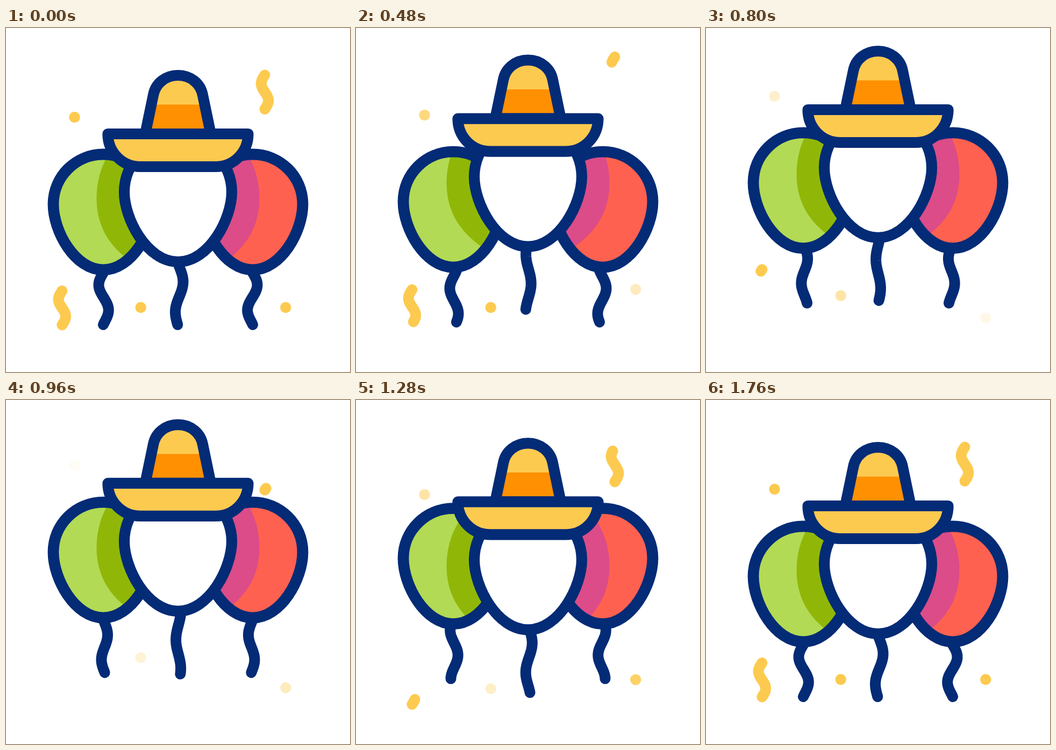
An HTML page with a canvas for the animation above (1.88 s loop, 640x640 px).

```html
<!DOCTYPE html>
<html lang="en">
<head>
<meta charset="utf-8">
<title>Party balloons</title>
<style>
html, body { margin: 0; width: 100%; height: 100%; overflow: hidden; background: #fff; }
canvas { display: block; width: 640px; height: 640px; }
</style>
</head>
<body>
<canvas id="stage" width="640" height="640"></canvas>
<script>
const ctx = document.getElementById('stage').getContext('2d');
const LOOP = 1880, STEP = 40, TAU = Math.PI * 2;
const NAVY = '#042b76', YELLOW = '#fdca50', ORANGE = '#ff9001';

const sideEgg = new Path2D('M181 235C130 235 88 276 88 328C88 378 128 450 181 450C234 450 274 378 274 328C274 276 232 235 181 235Z');
const midEgg = new Path2D('M320 205C265 205 220 250 220 305C220 355 262 435 320 435C378 435 420 355 420 305C420 250 375 205 320 205Z');
const shade = new Path2D('M206 216C182 240 168.5 278 168.5 316C168.5 360 184 403 240 440L320 440V216Z');
const crown = new Path2D('M259 197L274 125C278 103 297 88 320 88C343 88 362 103 366 125L381 197Z');
const brim = new Path2D('M189.5 197H450.5C450.5 231 424 258 390 258H250C216 258 189.5 231 189.5 197Z');

// A wave runs once down each string between start and end
const sideString = { x: 181.3, y: 455, length: 97, wave: 92, phase: 0.5, amp: 8.8, sway: 2, tip: 2.6, start: 340, end: 1480 };
const midString = { x: 322.8, y: 442, length: 110, wave: 108, phase: 0.03, amp: 6.7, sway: -2.3, tip: -3, start: 80, end: 1440 };

// Confetti floats off between out and back, then returns until end
const dots = [
  { x: 127.5, y: 166, out: 300, back: 1000, end: 1560 },
  { x: 520.3, y: 520, out: 80, back: 720, end: 1360 },
  { x: 250.7, y: 520, out: 500, back: 1100, end: 1680 }
];
const streamers = [
  { x: 481.5, y: 87.5, out: 80, back: 720, end: 1440 },
  { x: 104.3, y: 489, out: 360, back: 960, end: 1720 }
];

const mix = (a, b, u) => a + (b - a) * u;
const progress = (t, from, to) => Math.min(1, Math.max(0, (t - from) / (to - from)));
const bezier = (s, a, b) => 3 * (1 - s) ** 2 * s * a + 3 * (1 - s) * s * s * b + s ** 3;

function ease(u) {
  if (u <= 0 || u >= 1) return u;
  let lo = 0, hi = 1;
  for (let i = 0; i < 24; i++) {
    const mid = (lo + hi) / 2;
    if (bezier(mid, 0.59, 0.41) < u) lo = mid; else hi = mid;
  }
  return bezier(lo, 0, 1);
}

const eased = (t, from, to) => ease(progress(t, from, to));
const rise = (t, start) => -45 * (eased(t, start, start + 720) - eased(t, start + 720, start + 1440));
const drift = (t, p) => t < p.back ? -44 * eased(t, p.out, p.back) : 20 * (1 - eased(t, p.back, p.end));

function outline(path, width, fill) {
  if (fill) {
    ctx.fillStyle = fill;
    ctx.fill(path);
  }
  ctx.strokeStyle = NAVY;
  ctx.lineWidth = width;
  ctx.stroke(path);
}

function strokeCurve(color, from, to, point) {
  ctx.beginPath();
  for (let i = 0; i <= 40; i++) ctx.lineTo(...point(mix(from, to, i / 40)));
  ctx.strokeStyle = color;
  ctx.lineWidth = 20;
  ctx.stroke();
}

function drawString(string, t) {
  const { x, y, length, wave, phase, amp, sway, tip, start, end } = string;
  const u = progress(t, start, end), slack = Math.sin(Math.PI * u);
  strokeCurve(NAVY, 0, length, s => [
    x + sway * slack
      + amp * (1 - 0.35 * slack) * Math.sin(TAU * (s / wave - phase - u))
      + tip * (1 - slack) * (s / length) ** 4,
    y + s
  ]);
}

function drawSideBalloon(mirrored, light, dark, t) {
  const y = rise(t, 280);
  ctx.save();
  if (mirrored) {
    ctx.translate(640, 0);
    ctx.scale(-1, 1);
  }
  ctx.translate(0, y);
  drawString(sideString, t);
  ctx.fillStyle = light;
  ctx.fill(sideEgg);
  ctx.save();
  ctx.clip(sideEgg);
  ctx.translate(0, rise(t, 80) - y);
  ctx.fillStyle = dark;
  ctx.fill(shade);
  ctx.restore();
  outline(sideEgg, 20.8);
  ctx.restore();
}

function drawHat() {
  ctx.save();
  ctx.clip(crown);
  ctx.fillStyle = YELLOW;
  ctx.fillRect(240, 78, 160, 65);
  ctx.fillStyle = ORANGE;
  ctx.fillRect(240, 142.5, 160, 60);
  ctx.restore();
  outline(crown, 20.2);
  outline(brim, 20.2, YELLOW);
}

function drawMiddleBalloon(t) {
  ctx.save();
  ctx.translate(0, rise(t, 80));
  drawString(midString, t);
  outline(midEgg, 20.2, '#fff');
  drawHat();
  ctx.restore();
}

function drawDot(dot, t) {
  ctx.globalAlpha = t < dot.back ? 1 - progress(t, dot.out, dot.back) : progress(t, dot.back, dot.end);
  ctx.fillStyle = YELLOW;
  ctx.beginPath();
  ctx.arc(dot.x, dot.y + drift(t, dot), 10.2, 0, TAU);
  ctx.fill();
  ctx.globalAlpha = 1;
}

// Leaves by shrinking to its top, returns by growing from its bottom
function drawStreamer(s, t) {
  const leaving = t < s.back;
  const from = leaving ? 0 : 1 - eased(t, mix(s.back, s.end, 0.16), s.end);
  const to = leaving ? 1 - eased(t, s.out, mix(s.out, s.back, 0.92)) : 1;
  if (to <= from) return;
  const y = s.y + drift(t, s);
  strokeCurve(YELLOW, from, to, v => [s.x - 6.7 * Math.sin(TAU * v), y + 63.5 * v]);
}

function draw(t) {
  ctx.fillStyle = '#fff';
  ctx.fillRect(0, 0, 640, 640);
  ctx.lineCap = ctx.lineJoin = 'round';
  dots.forEach(dot => drawDot(dot, t));
  streamers.forEach(s => drawStreamer(s, t));
  drawSideBalloon(false, '#b2da54', '#90b708', t);
  drawSideBalloon(true, '#ff6150', '#dc4c88', t);
  drawMiddleBalloon(t);
}

function tick() {
  const t = performance.now() % LOOP;
  draw(Math.floor(t / STEP) * STEP);
  requestAnimationFrame(tick);
}
tick();
</script>
</body>
</html>
```
